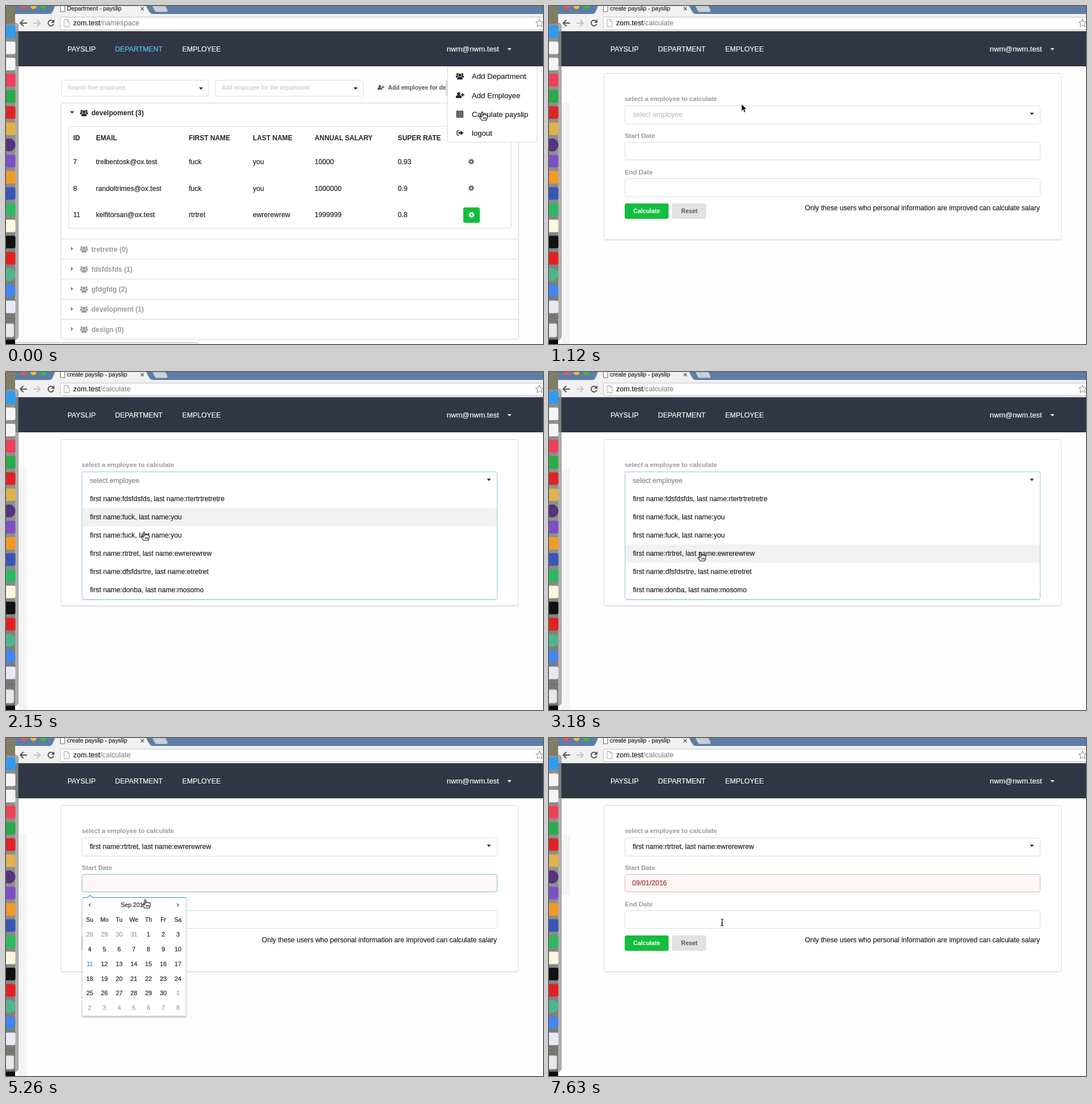
These frames come from a looping animation (943x594 px, 8 s). An HTML page:

```html
<!DOCTYPE html>
<html lang="en">
<head>
<meta charset="utf-8">
<title>Payslip</title>
<style>
  html, body { margin: 0; width: 100%; height: 100%; overflow: hidden; background: #fefefe; }
  svg { display: block; width: 943px; height: 594px; }
  text { font-family: "Liberation Sans", Arial, sans-serif; white-space: pre; }
</style>
</head>
<body>
<svg id="stage" viewBox="0 0 943 594" xmlns="http://www.w3.org/2000/svg">
  <defs>
    <g id="users">
      <circle cx="-4.2" cy="-3.6" r="1.9"/><circle cx="4.2" cy="-3.6" r="1.9"/>
      <path d="M-7 2.2v-2q0-1.600 2-1.600h10q2 0 2 1.600v2z"/>
      <g stroke="#fff" stroke-width=".8"><path d="M-5 6v-2.500q0-2.800 2.800-2.800h4.400q2.800 0 2.800 2.800v2.500z"/><circle cy="-2" r="3.100"/></g>
    </g>
    <g id="userPlus">
      <circle cx="-2" cy="-2.5" r="2.800"/><path d="M-7 5v-2q0-2.600 3-2.600h4q3 0 3 2.600v2z"/>
      <path d="M2-1.500h2v-2h1.800v2h2v1.800h-2v2h-1.800v-2h-2z"/>
    </g>
    <g id="calc">
      <rect x="-6" y="-6" width="12" height="12" rx="1"/>
      <path d="M-4.500-3.500h9M-4.500 0h9M-4.500 3.500h9" stroke="#fff" stroke-width="1.800" stroke-dasharray="2.200 1.200"/>
    </g>
    <g id="logout">
      <path d="M-1-4h-2.500q-1.500 0-1.500 1.500v5q0 1.500 1.500 1.500h2.500" fill="none" stroke="#222" stroke-width="1.400"/>
      <path d="M-2.500-1.500h4v-2.500l5 4-5 4v-2.500h-4z"/>
    </g>
    <g id="gear" fill="none" stroke="currentColor">
      <circle r="2.700" stroke-width="2.300"/><circle r="4" stroke-width="1.900" stroke-dasharray="1.800 1.340"/>
    </g>
    <path id="hand" d="M-1.500 0v-6.500q0-1.500-1.200-1.500t-1.200 1.500v8.500l-1.300-1.500q-1-1-1.700-.2t0 1.900l3.200 4.800h8.200q2-3 2-8 0-1.500-1.200-1.500t-1.200.8q-.2-1.500-1.400-1.500t-1.300.7q-.3-1.200-1.400-1.200t-1.500.7M-.500 1.500v3M1.500 1.500v3M3.500 1.500v3"
      fill="#fff" stroke="#111" stroke-width="1.100" stroke-linejoin="round"/>
    <path id="arrow" d="M0 0v13l3-2.700 2 4.900 2.400-1-2-4.700h4z" fill="#111" stroke="#fff" stroke-width=".9"/>
    <path id="ibeam" d="M-2.500-6q2 0 2.500 1.200 .5-1.200 2.500-1.200M0-5v10M-2.500 6q2 0 2.500-1.200 .5 1.200 2.500 1.200M-1.500 1h3" fill="none" stroke="#111" stroke-width="1.200"/>
    <filter id="soft" x="-10%" y="-10%" width="120%" height="125%"><feDropShadow dx="0" dy="2" stdDeviation="1.500" flood-opacity=".25"/></filter>
    <linearGradient id="desk" x2="0" y2="1"><stop stop-color="#817e62"/><stop offset=".5" stop-color="#777"/><stop offset="1" stop-color="#0b0b0b"/></linearGradient>
  </defs>
</svg>
<script>
const LOOP = 8000, STEP = 147.5;
const stage = document.getElementById('stage');
const INK = '#222', LINE = '#dadbdc', GREEN = '#13bd3e';

// The thin stroke gives the slightly heavier look of smoothed screen type.
const text = (x, y, s, size = 12.15, fill = INK, extra = 'stroke-width=".2"') =>
  `<text x="${x}" y="${y}" font-size="${size}" fill="${fill}" stroke="${fill}" stroke-width=".2" ${extra.replace('stroke-width=".2"', '')}>${s}</text>`;
const bold = (x, y, s, size, fill, extra = '') =>
  `<text x="${x}" y="${y}" font-size="${size}" fill="${fill}" font-weight="700" ${extra}>${s}</text>`;
const rect = (x, y, w, h, fill, extra = '') =>
  `<rect x="${x}" y="${y}" width="${w}" height="${h}" fill="${fill}" ${extra}/>`;
const box = (x, y, w, h, stroke = LINE, fill = '#fff', id = '') =>
  rect(x + .5, y + .5, w, h, fill, `stroke="${stroke}" rx="3" ${id && `id="${id}"`}`);
const path = (d, fill = 'none', extra = '') => `<path d="${d}" fill="${fill}" ${extra}/>`;
const icon = (name, x, y, fill = INK, scale = 1) =>
  `<use href="#${name}" transform="translate(${x} ${y}) scale(${scale})" fill="${fill}" color="${fill}"/>`;
const caretDown = (x, y, fill = INK) => path(`M${x - 3.5} ${y - 2}h7l-3.5 4z`, fill);
const group = (id, ...parts) => `<g id="${id}">${parts.join('')}</g>`;

function departmentPage() {
  const rows = [
    ['7', 'trelbentosk@ox.test', 'fuck', 'you', '10000', '0.93'],
    ['8', 'randoltrimes@ox.test', 'fuck', 'you', '1000000', '0.9'],
    ['11', 'kelfitorsan@ox.test', 'rtrtret', 'ewrerewrew', '1999999', '0.8']
  ];
  const heads = ['ID', 'EMAIL', 'FIRST NAME', 'LAST NAME', 'ANNUAL SALARY', 'SUPER RATE'];
  const cols = [118, 158, 321, 433.5, 542, 688];
  const closed = ['tretretre (0)', 'fdsfdsfds (1)', 'gfdgfdg (2)', 'development (1)', 'design (0)'];
  const menu = [['users', 'Add Department'], ['userPlus', 'Add Employee'], ['calc', 'Calculate payslip'], ['logout', 'logout']];
  return group('departments',
    box(97, 130, 259, 28), text(108, 147, 'Search free employee', 10.4, '#c8c8c8'), caretDown(342.5, 145),
    box(367, 130, 260, 28), text(379, 147, 'Add employee for the department', 10.4, '#c8c8c8'), caretDown(614, 145),
    icon('userPlus', 658, 143, '#555', .8), bold(671, 147, 'Add employee for de', 10.3, '#555'),
    rect(772, 130, 4, 28, '#dedede'),
    box(96, 170, 804, 415, '#d4d4d5'),
    caretDown(116, 187), icon('users', 137, 188), bold(150, 192, 'develpoment (3)', 12, INK),
    box(109, 211, 778, 179),
    heads.map((h, i) => bold(cols[i], 236, h, 11.9, INK)).join(''),
    rows.map((row, j) => row.map((s, i) => text(cols[i], 278 + 46.6 * j, s)).join('')).join(''),
    icon('gear', 817, 273.5, '#666'), icon('gear', 817, 320, '#666'),
    rect(803, 354, 29, 27, GREEN, 'rx="3"'), icon('gear', 817.5, 367, '#fff'),
    closed.map((s, i) => {
      const y = 409.5 + 35.25 * i;
      return path(`M96 ${y}h804`, 'none', 'stroke="#d4d4d5"') +
        path(`M114 ${y + 13.5}l4 3.500-4 3.500z`, '#888') +
        icon('users', 137, y + 18, '#999') + bold(150, y + 22, s, 12, '#999');
    }).join(''),
    rect(775.5, 104.5, 157, 135, '#fff', 'stroke="#d8d8d9" rx="3"'),
    menu.map(([name, s], i) => icon(name, 797, 123.500 + 33.200 * i) + text(818, 128.300 + 33.200 * i, s, 13.1)).join(''),
    rect(16, 591.5, 321, 4, '#eee', 'stroke="#bbb" rx="2"'));
}

const people = ['first name:fdsfdsfds, last name:rtertrtretretre', 'first name:fuck, last name:you',
  'first name:fuck, last name:you', 'first name:rtrtret, last name:ewrerewrew',
  'first name:dfsfdsrtre, last name:etretret', 'first name:donba, last name:mosomo'];

const dayX = i => 147 + 25.83 * i, dayY = j => 345 + 25.85 * j;

function calendar() {
  const mid = 'text-anchor="middle"';
  const days = Array.from({ length: 42 }, (_, i) => {
    const n = i - 3, inside = n > 0 && n <= 30;
    const label = n <= 0 ? n + 31 : inside ? n : n - 30;
    const id = inside ? `id="day${n}"` : '';
    return text(dayX(i % 7), dayY(Math.floor(i / 7)) + 4, label, 10.8, inside ? INK : '#999', `${mid} ${id}`);
  });
  return group('calendar',
    rect(134, 280, 182, 208.500, '#fff', 'stroke="#ccc" stroke-width=".8" filter="url(#soft)"'),
    rect(0, 0, 26, 26, '#f0f0f0', 'id="hover"'),
    path('M134 280.500h8.500l5-4 5 4H316', '#fff', 'stroke="#3b9be0" stroke-width="1.200"'),
    text(147, 297, '‹', 12, INK, mid), text(302, 297, '›', 12, INK, mid), text(224, 297, 'Sep 2016', 10.4, INK, mid),
    ['Su', 'Mo', 'Tu', 'We', 'Th', 'Fr', 'Sa'].map((s, i) => text(dayX(i), 323, s, 10.6, INK, mid)).join(''),
    ...days);
}

function calculatePage() {
  return group('calculate',
    rect(22, 170, 15, 424, '#f4f4f4', 'id="strip"'),
    rect(97, 411, 803, 1, '#e6e6e6'), box(96, 118, 803, 292, '#d9dadb'),
    bold(133, 167, 'select a employee to calculate', 11.3, '#999'),
    bold(133, 231.5, 'Start Date', 11.3, '#999'), bold(133, 295.5, 'End Date', 11.3, '#999'),
    box(133, 175, 729, 32), box(133, 239, 729, 31, LINE, '#fff', 'startBox'), box(133, 303, 729, 31),
    text(146, 259, '09/01/2016', 12.2, '#9f3a38', 'id="startValue"'),
    rect(133, 347, 77, 27, GREEN, 'rx="3"'), bold(148, 363.5, 'Calculate', 10.6, '#fff'),
    rect(216, 347, 60, 27, '#e0e1e2', 'rx="3"'), bold(232, 363.5, 'Reset', 10.6, '#5a5a5a'),
    text(862, 359, 'Only these users who personal information are improved can calculate salary', 12.1, INK, 'text-anchor="end"'),
    group('options', box(133, 175, 729, 224, '#96c8da'), rect(134, 400, 728, 1.5, '#dfe6e9'),
      rect(134, 0, 728, 31.500, '#f1f1f1', 'id="optionHover"'),
      people.map((s, i) => text(147.5, 227.3 + 31.900 * i, s)).join('')),
    text(147, 195.3, '', 12.1, INK, 'id="chosen"'), caretDown(848, 189.5),
    rect(147, 183, 1, 14, '#111', 'id="caret"'),
    calendar());
}

function browser() {
  const nav = (x, s, id = '') => text(x, 80.3, s, 12.3, '#fff', id);
  return group('browser',
    rect(16, 0, 927, 14.500, '#5d7da4'),
    ['#f4544d', '#f5bd2f', '#2ac440'].map((c, i) => `<circle cx="${31 + 17.300 * i}" cy="0" r="5.300" fill="${c}"/>`).join(''),
    rect(16, 14, 927, 30.500, '#f1f1f1'),
    path('M76 14.500q5-1 7-7l3-8H246l4 8q3 6 8 7z', '#f1f1f1', 'stroke="#9aabc0" stroke-width=".7"'),
    rect(76, 14, 184, 2, '#f1f1f1'),
    path('M257 0h23l4 8q0 2.500-3 2.500h-16q-3 0-4-2.500z', '#c9d0d9', 'stroke="#8899ad" stroke-width=".7"'),
    path('M95.500-2v12h7.500v-9l-3-3', '#fff', 'stroke="#666"'),
    text(107, 8, '', 10.4, '#222', 'id="tab"'),
    path('M236.500 2l5.500 5.500m0-5.500l-5.500 5.500', 'none', 'stroke="#555" stroke-width="1.200"'),
    path('M37 30H25m5.500-5.500l-5.500 5.500 5.500 5.500', 'none', 'stroke="#555" stroke-width="2"'),
    path('M48 30h12m-5.500-5.500l5.500 5.500-5.500 5.500', 'none', 'stroke="#c3c3c3" stroke-width="2"'),
    path('M83 27a5 5 0 1 0 .8 4.500', 'none', 'stroke="#555" stroke-width="2"'), path('M85 23.500v6h-6z', '#555'),
    box(95, 19, 860, 22, '#c2c2c2'),
    path('M102 23.500h5.500l3.500 3.500v9.500h-9zM107.500 23.500v3.500h3.500', '#fff', 'stroke="#999" stroke-width=".9"'),
    text(118, 34.3, 'zom.test<tspan id="route" fill="#777" stroke="none"></tspan>', 12.6, '#222'),
    path('M937 23l2 4.700 5 .4-3.800 3.300 1.200 4.900-4.400-2.600-4.400 2.600 1.200-4.900-3.800-3.300 5-.4z', '#fff', 'stroke="#888"'),
    rect(16, 44.3, 927, 61.700, '#303643'),
    nav(108, 'PAYSLIP'), nav(191.500, 'DEPARTMENT', 'id="navDepartment"'), nav(309.500, 'EMPLOYEE'),
    text(774, 80.3, 'nwm@nwm.test', 12.85, '#fff'), caretDown(884, 76, '#fff'));
}

function dock() {
  const squares = ['#2f9cf0', '#f5f5f5', '#f4f4f4', '#ee4056', '#2da84a', '#dd2525', '#e0b24c', '#54347e', '#7c4fc4',
    '#f09a28', '#3b55b5', '#2fb862', '#fdf6df', '#111', '#e0221f', '#4fb58d', '#4285f4', '#e9e9f6'];
  const round = [7, 15, 16];
  return group('dock',
    rect(0, 0, 16, 594, 'url(#desk)'),
    rect(-8, 30, 29.500, 556, '#969694', 'rx="5" opacity=".76" stroke="#777"'),
    squares.map((c, i) => {
      const y = 45 + 28.450 * i;
      return round.includes(i) ? `<circle cx="5" cy="${y}" r="11.500" fill="${c}"/>` : rect(-8, y - 11, 24.500, 22, c, 'rx="3"');
    }).join(''),
    path('M0 548.500h16', 'none', 'stroke="#666"'), rect(-8, 558, 22, 24, '#e6e8ea', 'rx="3" stroke="#aaa"'));
}

stage.insertAdjacentHTML('beforeend', departmentPage() + calculatePage() + browser() + dock() + '<use id="cursor"/>');
const el = Object.fromEntries([...stage.querySelectorAll('[id]')].map(n => [n.id, n]));

// time, x, y, pointer shape
const pointer = [
  [0, 839, 194, 'hand'], [300, 839, 194, 'arrow'], [1120, 338, 172, 'arrow'], [1270, 336, 173, 'arrow'],
  [1555, 324, 186, 'ibeam'], [1700, 312, 196, 'hand'], [2150, 245, 289, 'hand'], [2600, 264, 321, 'hand'],
  [3180, 269, 325, 'hand'], [3770, 267, 322, 'ibeam'], [4220, 260, 309, 'ibeam'], [4800, 246, 257, 'ibeam'],
  [4955, 246, 258, 'ibeam'], [5250, 247, 292, 'hand'], [6000, 259, 345, 'hand'], [6290, 260, 347, 'hand'],
  [7030, 261, 349, 'hand'], [7320, 322, 351, 'arrow'], [7470, 352, 345, 'arrow'], [7610, 304, 324, 'ibeam'], [LOOP, 304, 324, 'ibeam']
];

function pointerAt(t) {
  const q = t < 300 ? 0 : Math.max(300, 1120 + Math.floor((t - 1112) / STEP) * STEP);
  const i = Math.max(0, pointer.findLastIndex(k => k[0] <= q + 8));
  const [t0, x0, y0, shape] = pointer[i], [t1, x1, y1] = pointer[Math.min(i + 1, pointer.length - 1)];
  const p = t1 > t0 ? Math.min(1, Math.max(0, (q - t0) / (t1 - t0))) : 0;
  const e = p * p * (3 - 2 * p);
  return { x: x0 + (x1 - x0) * e, y: y0 + (y1 - y0) * e, shape };
}

const show = (node, on) => node.setAttribute('visibility', on ? 'inherit' : 'hidden');
const set = (node, attrs) => { for (const k in attrs) node.setAttribute(k, attrs[k]); };
const tint = (node, color) => set(node, { fill: color, stroke: color });

function render(t) {
  const between = (a, b) => t >= a && t < b;
  const first = t < 300, open = between(1700, 3775), picking = between(4955, 7325);
  const picked = t >= 6590, selected = t >= 3475;
  const { x, y, shape } = pointerAt(t);

  show(el.departments, first);
  show(el.calculate, !first);
  el.tab.textContent = first ? 'Department - payslip' : 'create payslip - payslip';
  el.route.textContent = first ? '/namespace' : '/calculate';
  tint(el.navDepartment, first ? '#54c8f5' : '#fff');
  set(el.strip, { height: t < 7325 ? 424 : 106 });

  show(el.options, open);
  const row = t < 2290 ? 1 : t < 2440 ? 2 : 3;
  set(el.optionHover, { y: 207.5 + 31.900 * row });
  show(el.optionHover, open && t >= 2000);
  el.chosen.textContent = selected ? people[3] : 'select employee';
  tint(el.chosen, selected ? INK : open ? '#858585' : '#bfbfbf');
  show(el.caret, between(3775, 4955));

  show(el.startValue, picked);
  set(el.startBox, {
    fill: t >= 4955 ? '#fff6f6' : '#fff',
    stroke: picked ? '#e0b4b4' : t >= 4955 ? '#85b7d9' : LINE
  });
  show(el.calendar, picking);
  tint(el.day11, picked ? INK : '#2196f3');
  tint(el.day1, picked ? '#2196f3' : INK);
  const col = Math.floor((x - 2 - 134) / 25.83), line = Math.floor((y - 7 - 332) / 25.85);
  set(el.hover, { x: dayX(col) - 13, y: dayY(line) - 13 });
  show(el.hover, picking && shape === 'hand' && line >= 0 && col < 7);

  set(el.cursor, { href: '#' + shape, transform: `translate(${x.toFixed(1)} ${y.toFixed(1)})` });
}

const start = performance.now();
function tick() {
  render((performance.now() - start) % LOOP);
  requestAnimationFrame(tick);
}
tick();
</script>
</body>
</html>
```
